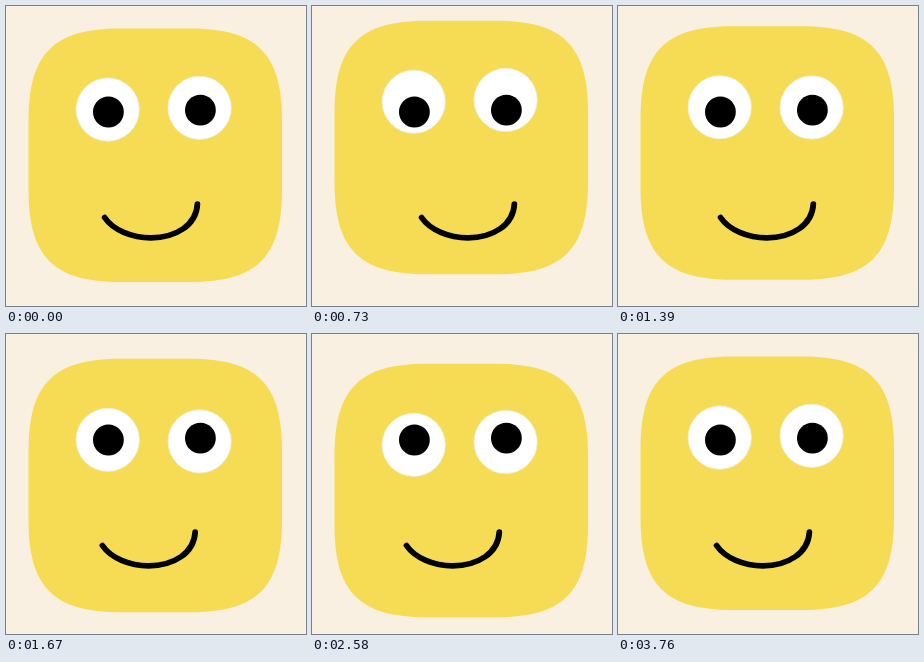
Animation of 300 by 300 pixels, one loop 4 s. Source, as an HTML page:

```html
<!DOCTYPE html>
<html lang="en">
<head>
<meta charset="utf-8">
<title>Bobbing smiley</title>
<style>
  html, body { margin: 0; width: 100%; height: 100%; overflow: hidden; background: #faf0e1; }
  svg { display: block; width: 100vw; height: 100vh; }
  .eye { fill: #fff; stroke: #f2ecd8; stroke-width: .8; }
</style>
</head>
<body>
<svg viewBox="0 0 300 300">
  <g id="face">
    <path fill="#f6dc54" d="M22.5 114.5C22.5 47.5 47.5 22.5 114.5 22.5H184C251 22.5 276 47.5 276 114.5V184C276 251 251 276 184 276H114.5C47.5 276 22.5 251 22.5 184Z"/>
    <circle class="eye" cx="101.7" cy="103.6" r="31.6"/>
  </g>
  <circle class="eye" id="rightEye" cx="193.6" cy="101.8" r="31.6"/>
  <circle cx="102.4" cy="106" r="15.4"/>
  <circle cx="194.4" cy="104.2" r="15.4"/>
  <path id="mouth" fill="none" stroke="#000" stroke-width="5.7" stroke-linecap="round"
    d="M98.6 211.5C107 224 126 231.8 144.8 231.8C170 231.8 190.4 219 191.4 198"/>
</svg>
<script>
  const LOOP = 4000;

  // [time, offset] pairs joined by straight segments
  const faceKeys = [[0, 0], [933, -10], [2133, 10], [3750, 0], [LOOP, 0]];
  const eyeKeys = [[0, 0], [933, -10], [1880, 10], [3750, 0], [LOOP, 0]];
  const mouthKeys = [[0, 0], [933, 14], [1870, -6.6], [3750, 0], [LOOP, 0]];

  function valueAt(keys, t) {
    const i = keys.findIndex(([time]) => time > t);
    const [t0, v0] = keys[i - 1], [t1, v1] = keys[i];
    return v0 + (v1 - v0) * (t - t0) / (t1 - t0);
  }

  function move(id, x, y) {
    document.getElementById(id).setAttribute('transform', `translate(${x} ${y})`);
  }

  function draw() {
    const t = performance.now() % LOOP;
    move('face', 0, valueAt(faceKeys, t));
    move('rightEye', 0, valueAt(eyeKeys, t));
    move('mouth', valueAt(mouthKeys, t), 0);
    requestAnimationFrame(draw);
  }
  draw();
</script>
</body>
</html>
```
